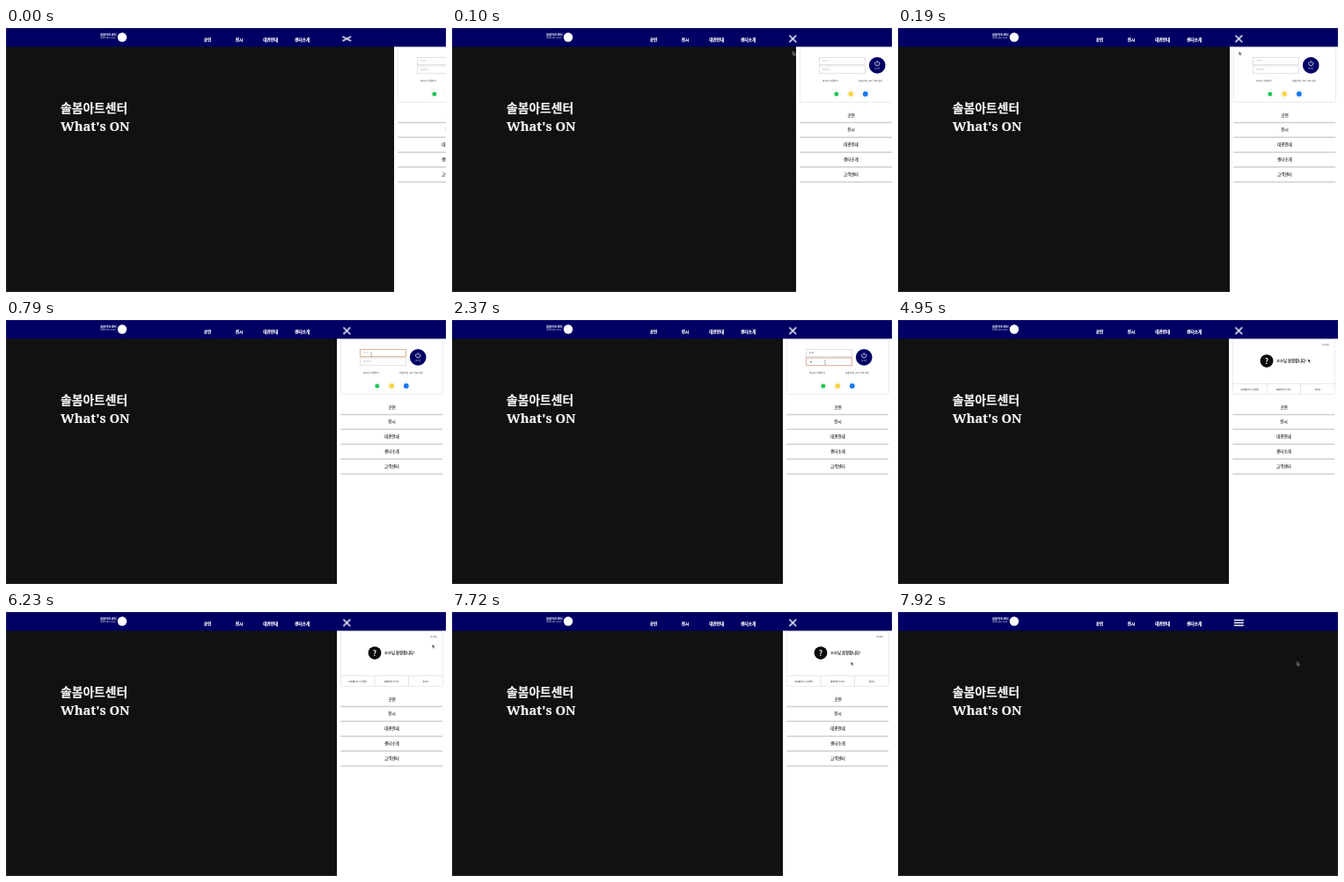
An HTML page for the animation above (8 s loop, 500 by 300 pixels).

```html
<!DOCTYPE html>
<html lang="ko">
<head>
<meta charset="utf-8">
<title>솔봄아트센터</title>
<style>
html, body { margin: 0; width: 100%; height: 100%; overflow: hidden; background: #10120f; }
svg { display: block; width: 100vw; height: 100vh; font-family: "Noto Sans CJK KR", "Noto Sans CJK", "Noto Sans", sans-serif; }
.bold { font-weight: 700; }
.mid { text-anchor: middle; }
.serif { font-family: "Noto Serif", serif; font-weight: 700; }

/* Everything shares one 8 s loop; most parts switch hard. */
.panel, .bar, .login, .member, .focus1, .focus2, .hint1, .hint2, .key1, .key2, .dot1, .dot2, .dot3, .arrow, .beam {
  animation: 8s step-end infinite;
}
.panel { animation-name: panel; }
@keyframes panel {
  0% { transform: translateX(65px); }
  1.25% { transform: translateX(15px); }
  2.375% { transform: translateX(1px); }
  3.625% { transform: none; }
  99%, 100% { transform: translateX(126px); }
}
.bar { transform-origin: 387.3px 12.3px; }
.top { animation-name: top; }
.middle { animation-name: middle; }
.bottom { animation-name: bottom; }
@keyframes top {
  0% { transform: rotate(28deg); }
  1.25% { transform: rotate(45deg); }
  99%, 100% { transform: translateY(-3px); }
}
@keyframes middle { 0% { opacity: 0; } 99%, 100% { opacity: 1; } }
@keyframes bottom {
  0% { transform: rotate(-28deg); }
  1.25% { transform: rotate(-45deg); }
  99%, 100% { transform: translateY(3px); }
}

.login { animation-name: login; }
.member { animation-name: member; }
@keyframes login { 0% { opacity: 1; } 48.25%, 100% { opacity: 0; } }
@keyframes member { 0% { opacity: 0; } 48.25%, 100% { opacity: 1; } }

.focus1 { animation-name: focus1; }
.focus2 { animation-name: focus2; }
@keyframes focus1 { 0% { opacity: 0; } 8.625% { opacity: 1; } 25.875%, 100% { opacity: 0; } }
@keyframes focus2 { 0% { opacity: 0; } 25.875% { opacity: 1; } 48.25%, 100% { opacity: 0; } }

.hint1 { animation-name: hint1; }
.hint2 { animation-name: hint2; }
@keyframes hint1 { 0% { opacity: 1; } 14.75%, 100% { opacity: 0; } }
@keyframes hint2 { 0% { opacity: 1; } 29.625%, 100% { opacity: 0; } }
.key1 { animation-name: key1; }
.key2 { animation-name: key2; }
@keyframes key1 { 0% { opacity: 0; } 14.75%, 100% { opacity: 1; } }
@keyframes key2 { 0% { opacity: 0; } 18.5%, 100% { opacity: 1; } }
.dot1 { animation-name: dot1; }
.dot2 { animation-name: dot2; }
.dot3 { animation-name: dot3; }
@keyframes dot1 { 0% { opacity: 0; } 29.625%, 100% { opacity: 1; } }
@keyframes dot2 { 0% { opacity: 0; } 30.875%, 100% { opacity: 1; } }
@keyframes dot3 { 0% { opacity: 0; } 32.125%, 100% { opacity: 1; } }

.arrow { animation-name: arrow; }
.beam { animation-name: beam; }
@keyframes arrow {
  0% { opacity: 0; }
  1.25% { opacity: 1; }
  7.375% { opacity: 0; }
  37.125%, 100% { opacity: 1; }
}
@keyframes beam { 0% { opacity: 0; } 7.375% { opacity: 1; } 37.125%, 100% { opacity: 0; } }

.pointer { animation: pointer 8s linear infinite; }
@keyframes pointer {
  0%, 2.375% { transform: translate(387.4px, 26.6px); }
  8.625%, 22.25% { transform: translate(415px, 39px); }
  25.875%, 33.375% { transform: translate(424px, 48px); }
  38.375%, 69.25% { transform: translate(466px, 44px); }
  73% { transform: translate(474px, 55px); }
  79.125% { transform: translate(487px, 32px); }
  81.75%, 86.625% { transform: translate(488px, 30px); }
  90.375%, 96.4% { transform: translate(453.6px, 57px); }
  96.5%, 100% { transform: translate(453.4px, 56.4px); }
}
</style>
</head>
<body>
<svg viewBox="0 0 500 300" preserveAspectRatio="none">
  <rect width="500" height="300" fill="#10120f"/>
  <g fill="#f4f4f4" stroke="#f4f4f4" stroke-width=".2">
    <text class="bold" x="62" y="95.6" font-size="13.8">솔봄아트센터</text>
    <text class="serif" x="62" y="116.5" font-size="14.7">What's ON</text>
  </g>

  <g class="panel">
    <rect x="376" y="20" width="124.5" height="280" fill="#fff"/>
    <rect x="380.3" y="22" width="116" height="62.3" rx="2" fill="none" stroke="#dcdcdc" stroke-width=".6"/>

    <g class="login" font-size="2.7" fill="#333">
      <g fill="#fff" stroke="#c4c4c4" stroke-width=".5">
        <rect x="402.3" y="33.4" width="52" height="8.4"/>
        <rect x="402.3" y="43" width="52" height="8.8"/>
      </g>
      <rect class="focus1" x="402.3" y="33.4" width="52" height="8.4" fill="none" stroke="#e6a880" stroke-width=".8"/>
      <rect class="focus2" x="402.3" y="43" width="52" height="8.8" fill="none" stroke="#dfa28e" stroke-width=".8"/>
      <text class="hint1" x="406" y="38.4" font-size="2.5" fill="#aaa">아이디</text>
      <text class="hint2" x="406" y="48.2" font-size="2.5" fill="#aaa">비밀번호</text>
      <text class="key1" x="406" y="38.4">ㅁ</text>
      <text class="key2" x="408.5" y="38.4">ㅁ</text>
      <circle class="dot1" cx="407.8" cy="47.6" r=".75"/>
      <circle class="dot2" cx="410" cy="47.6" r=".75"/>
      <circle class="dot3" cx="412.2" cy="47.6" r=".75"/>

      <circle cx="468.2" cy="42.4" r="9.3" fill="#000064"/>
      <path d="M466.4 38.4a2.6 2.6 0 1 0 3.6 0M468.2 37.1v3.2" fill="none" stroke="#fff" stroke-width=".8"/>
      <text class="mid" x="468.2" y="47" font-size="2.3" fill="#fff">로그인</text>

      <text x="406" y="61.4">아이디 저장하기</text>
      <text x="447" y="61.4">회원가입 | ID / PW 찾기</text>
      <g fill="#fff" stroke="#e4e4e4" stroke-width=".5">
        <circle cx="421.8" cy="74.9" r="4.6"/>
        <circle cx="438.2" cy="74.9" r="4.6"/>
        <circle cx="454.8" cy="74.9" r="4.6"/>
      </g>
      <circle cx="421.8" cy="74.9" r="2.5" fill="#22c65b"/>
      <circle cx="438.2" cy="74.9" r="2.8" fill="#f8d548"/>
      <circle cx="454.8" cy="74.9" r="2.9" fill="#1877f2"/>
    </g>

    <g class="member" fill="#222">
      <text class="mid" x="486" y="28.8" font-size="2.2">로그아웃</text>
      <circle cx="419" cy="46.6" r="7.4" fill="#0a0a0a"/>
      <text class="mid bold" x="419" y="49.7" font-size="8.5" fill="#fff">?</text>
      <text class="bold" x="430" y="47.9" font-size="4.3">ㅁㅁ님 환영합니다!</text>
      <path d="M380.3 72.4h116M419 72.4v12M457.5 72.4v12" stroke="#d4d4d4" stroke-width=".6"/>
      <g class="mid" font-size="2.4">
        <text x="399.8" y="79.5">마이페이지 수정확인</text>
        <text x="438.4" y="79.5">예매확인 및 취소</text>
        <text x="476.8" y="79.5">좋아요</text>
      </g>
    </g>

    <g class="mid" font-size="4.6" fill="#222" stroke="#222" stroke-width=".1">
      <text x="438.4" y="100.5">공연</text>
      <text x="438.4" y="117.4">전시</text>
      <text x="438.4" y="134.3">대관안내</text>
      <text x="438.4" y="151.2">센터소개</text>
      <text x="438.4" y="168.1">고객센터</text>
    </g>
    <path d="M380.3 107.4h115.7m-115.7 16.9h115.7m-115.7 16.9h115.7m-115.7 16.9h115.7m-115.7 16.9h115.7" stroke="#d0d0d4" stroke-width="1.5"/>
  </g>

  <rect width="500" height="21.3" fill="#000064"/>
  <g fill="#fff">
    <text class="bold" x="107" y="9.4" font-size="3.4">솔봄아트센터</text>
    <text x="107" y="12" font-size="1.6">SOLBOM ARTS CENTER</text>
    <circle cx="132" cy="10.5" r="5.2"/>
    <g class="mid bold" font-size="4.6" stroke="#fff" stroke-width=".2">
      <text x="229" y="14.9">공연</text>
      <text x="265" y="14.9">전시</text>
      <text x="300.7" y="14.9">대관안내</text>
      <text x="336.7" y="14.9">센터소개</text>
    </g>
    <g fill="#e6e6ee">
      <rect class="bar top" x="381.8" y="11.5" width="11" height="1.6"/>
      <rect class="bar middle" x="381.8" y="11.5" width="11" height="1.6"/>
      <rect class="bar bottom" x="381.8" y="11.5" width="11" height="1.6"/>
    </g>
  </g>
  <rect width="500" height="300" fill="none" stroke="#fff" stroke-opacity=".18"/>

  <g class="pointer">
    <path class="arrow" d="M0 0v4l1-.8.7 1.6.8-.3-.7-1.6h1.3z" fill="#111" stroke="#e8e8e8" stroke-width=".45"/>
    <path class="beam" d="M-1-2.2h2M0-2.2v4.4M-1 2.2h2" fill="none" stroke="#777" stroke-width=".5"/>
  </g>
</svg>
</body>
</html>
```
